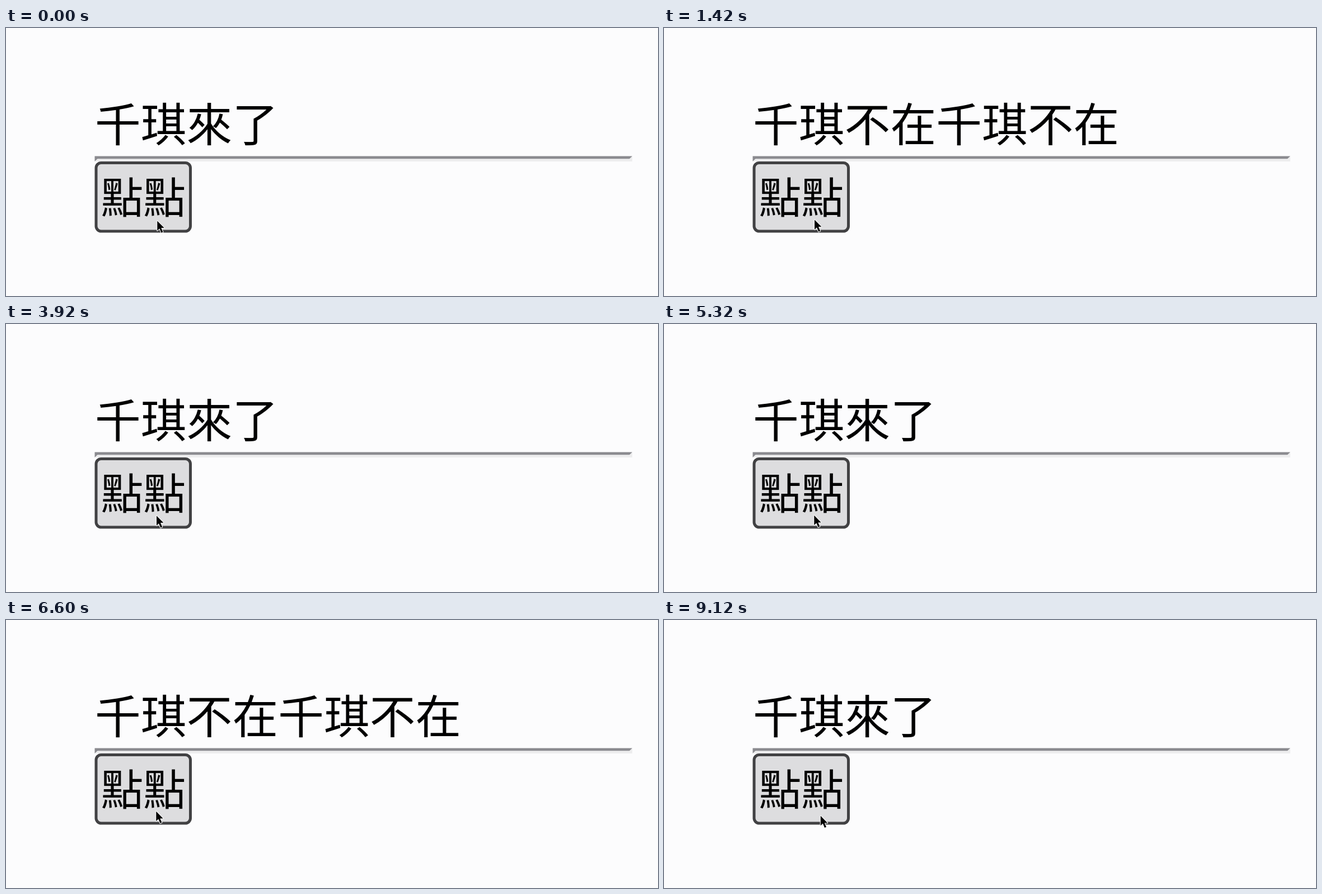
Recreate the animation shown at these times as an HTML page. Size 1165 by 480 pixels, loop 9.14 s.

```html
<!DOCTYPE html>
<html lang="zh-Hant">
<head>
<meta charset="utf-8">
<title>點點</title>
<style>
  html, body { margin: 0; width: 100%; height: 100%; overflow: hidden; background: #fcfcfd; }
  svg { display: block; width: 100%; height: 100%; }
  text { font-family: "Noto Sans CJK TC", "Noto Sans CJK", "Noto Sans CJK JP", sans-serif; fill: #000; }
</style>
</head>
<body>
<svg viewBox="0 0 1165 480">
  <rect width="1165" height="480" fill="#fcfcfd"/>
  <text id="message" x="159" y="203" font-size="81.8"></text>
  <path d="M159 239L163.5 234H1114L1119 229.5V239Z" fill="#ededee"/>
  <path d="M158.5 229.5H1119L1114 234.3H163.5L158.5 239Z" fill="#8b8b90"/>
  <rect id="button" x="161" y="241.5" width="168.500" height="122.500" rx="9" stroke-width="5"/>
  <text x="169.5" y="331.5" font-size="75.8">點點</text>
  <path id="cursor" d="M0 0V17.500L4 13.800L7.200 21.300L10.200 20L7 12.600H12.400Z"
        stroke="#fff" stroke-width="2" stroke-linejoin="round" paint-order="stroke"/>
</svg>
<script>
const LOOP = 9140;
const PRESS = 100;
const NAME = '千琪';
const MESSAGES = [NAME + '來了', (NAME + '不在').repeat(2)];
const CLICKS = [580, 3240, 5880, 8380];

const [message, button, cursor] =
  ['message', 'button', 'cursor'].map(id => document.getElementById(id));

const progress = (t, start, length) => Math.min(1, Math.max(0, (t - start) / length));
const ease = p => (1 - Math.cos(Math.PI * p)) / 2;

// Each click holds the button, then fades the old message out and the new one in.
function messageAt(t) {
  const count = CLICKS.filter(start => start <= t).length;
  if (!count) return { text: MESSAGES[0], opacity: 1, pressed: false };
  const start = CLICKS[count - 1];
  const length = 840 - 120 * count; // later clicks fade faster
  const p = progress(t, start + PRESS, length);
  const shown = p < 0.5 ? count - 1 : count;
  return {
    text: MESSAGES[shown % 2],
    opacity: ease(Math.abs(2 * p - 1)),
    pressed: t < start + PRESS
  };
}

// The pointer settles at the start, twitches once and moves off at the end.
function pointerAt(t) {
  const settle = progress(t, 0, 280);
  const leave = progress(t, 8960, 160);
  const twitch = t >= 5040 ? 0.7 : 0;
  return [
    270.3 - 1.3 * settle - twitch + 11.5 * leave,
    345.5 - 2 * settle - twitch + 8 * leave
  ];
}

function draw(t) {
  const { text, opacity, pressed } = messageAt(t);
  if (message.textContent !== text) message.textContent = text;
  message.setAttribute('opacity', opacity);
  button.setAttribute('fill', pressed ? '#f1f1f3' : '#dddddf');
  button.setAttribute('stroke', pressed ? '#808081' : '#414143');
  cursor.setAttribute('transform', `translate(${pointerAt(t)})`);
}

const began = performance.now();
function tick() {
  draw((performance.now() - began) % LOOP);
  requestAnimationFrame(tick);
}
tick();
</script>
</body>
</html>
```
